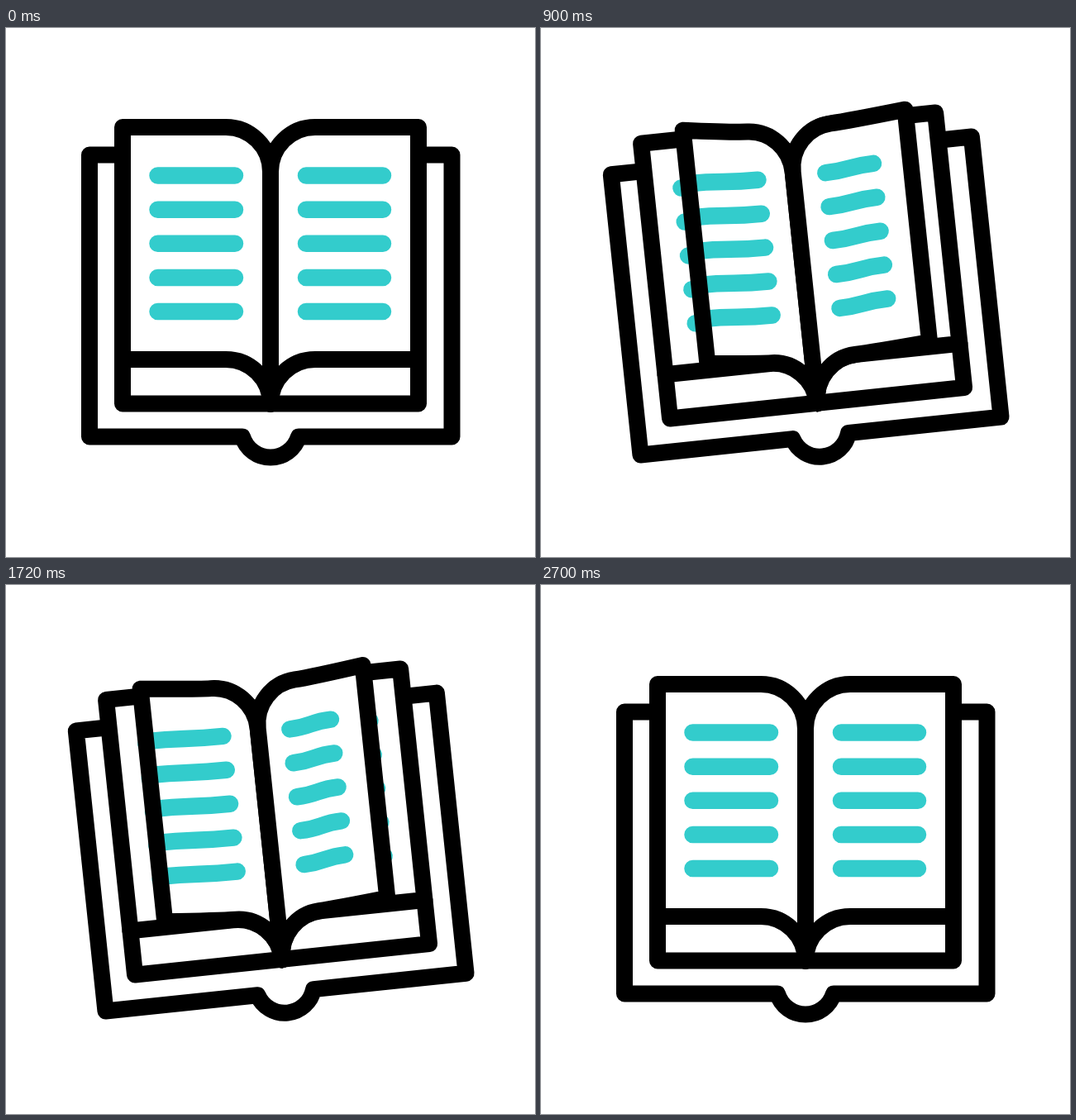
Write an HTML page with a canvas that moves like this. It is 640x640 px and loops after 3600 ms.

```html
<!DOCTYPE html>
<html lang="en">
<head>
<meta charset="utf-8">
<title>Book</title>
<style>
  html, body { margin: 0; width: 100%; height: 100%; overflow: hidden; background: #fff; }
  canvas { display: block; }
</style>
</head>
<body>
<canvas id="stage" width="640" height="640"></canvas>
<script>
const ctx = document.getElementById('stage').getContext('2d');
const LOOP = 3600;
const SPINE = 320;
const TEAL = '#33cccc';

// [time, value], eased between neighbours
const SHIFT = [[0, 0], [280, 47], [560, -25.8], [840, 0], [1690, 0], [1970, -25.8], [2265, 47], [2550, 0]];
const TILT = [[0, 0], [300, -6], [2240, -6], [2540, 0]];
const FLIP = { first: 349, gap: 401, length: 735, count: 5 };

const cover = new Path2D(
  'M141 153.5H101V494.5H286A35.6 35.6 0 0 0 354 494.5H539.5V153.5H499');
const base = new Path2D('M141 401V454.5H499V401');

function track(keys, t) {
  for (let i = 1; i < keys.length; i++) {
    const [t0, a] = keys[i - 1], [t1, b] = keys[i];
    if (t < t1) {
      const p = (t - t0) / (t1 - t0);
      return a + (b - a) * p * p * (3 - 2 * p);
    }
  }
  return keys[keys.length - 1][1];
}

// Points along the top or bottom edge of a leaf, from tip to spine
function edge(w, y, rise) {
  const b = 1 - Math.abs(w);
  const bend = Math.sign(w) * 54 * (1 - b * b);
  const kneeY = y - rise * 0.8 * b * b;
  const slope = rise * b * 0.6;
  return {
    tip: [SPINE + 179 * w, y - rise],
    far: [SPINE + bend * 1.38, kneeY - slope * 0.7],
    knee: [SPINE + bend, kneeY],
    near: [SPINE + bend * 0.45, kneeY + slope],
    root: [SPINE, y + 24],
    end: [SPINE, y + 54]
  };
}

// Outline of a leaf; w runs from 1 (flat right) to -1 (flat left)
function outline(w, rise) {
  const top = edge(w, 120, rise);
  const low = edge(w, 401, rise * 0.75);
  const path = new Path2D();
  path.moveTo(...top.tip);
  path.quadraticCurveTo(...top.far, ...top.knee);
  path.bezierCurveTo(...top.near, ...top.root, ...top.end);
  path.lineTo(...low.end);
  path.bezierCurveTo(...low.root, ...low.near, ...low.knee);
  path.quadraticCurveTo(...low.far, ...low.tip);
  path.closePath();
  return path;
}

function textLines(w, rise) {
  let x0, x1, lift0 = 0, lift1 = 0;
  if (w < 0) {
    if (w > -0.31) return;
    x0 = Math.max(183.5, SPINE + 179 * w);
    x1 = 277;
    lift0 = rise * 0.4;
  } else {
    const q = Math.min(1, Math.pow(1.03 * w, 2.4));
    x0 = SPINE + 33 + 10 * q;
    x1 = SPINE + 34 + 102 * q;
    lift1 = Math.min(8, 26 * (1 - w));
  }
  const mid = (x0 + x1) / 2;
  ctx.strokeStyle = TEAL;
  ctx.lineWidth = 20.5;
  ctx.beginPath();
  for (let i = 0; i < 5; i++) {
    const y = 178.5 + 41.15 * i;
    ctx.moveTo(x0, y - lift0);
    ctx.bezierCurveTo(mid, y - lift0, mid, y - lift1, x1, y - lift1);
  }
  ctx.stroke();
}

function ink(path) {
  ctx.strokeStyle = '#000';
  ctx.lineWidth = 20;
  ctx.stroke(path);
}

function leaf(w) {
  const rise = 33 * (1 - Math.pow(Math.abs(w), 1.15));
  const path = outline(w, rise);
  ctx.fillStyle = '#fff';
  ctx.fill(path);
  ctx.save();
  ctx.clip(path);
  textLines(w, rise);
  ctx.restore();
  ink(path);
}

function draw(t) {
  ctx.setTransform(1, 0, 0, 1, 0, 0);
  ctx.fillStyle = '#fff';
  ctx.fillRect(0, 0, 640, 640);
  ctx.lineCap = ctx.lineJoin = 'round';

  ctx.translate(320, 320 + track(SHIFT, t));
  ctx.rotate(track(TILT, t) * Math.PI / 180);
  ctx.translate(-320, -320);

  ink(cover);
  ink(base);
  leaf(-1);
  leaf(1);
  for (let i = 0; i < FLIP.count; i++) {
    const p = (t - FLIP.first - i * FLIP.gap) / FLIP.length;
    if (p > 0 && p < 1) leaf(Math.cos(Math.PI * p));
  }
}

const start = performance.now();
function tick() {
  draw((performance.now() - start) % LOOP);
  requestAnimationFrame(tick);
}
tick();
</script>
</body>
</html>
```
